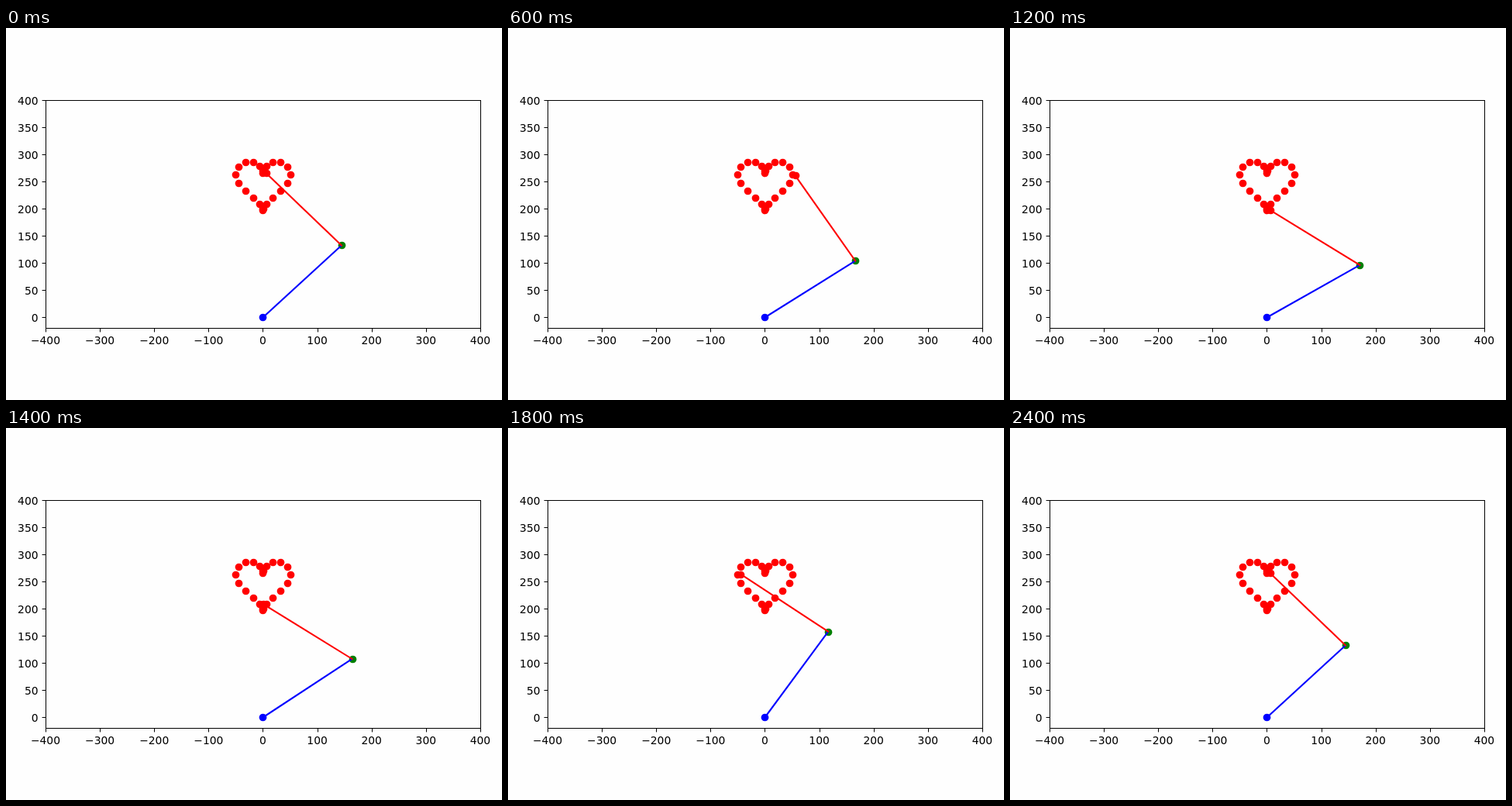
Animation, 640 px wide and 480 px high, one loop 2.5 s. Source, as an HTML page:

```html
<!DOCTYPE html>
<html lang="en">
<head>
<meta charset="utf-8">
<title>Two-link arm tracing a heart</title>
<style>
  html, body { margin: 0; width: 100%; height: 100%; overflow: hidden; background: #fefefe; }
  svg { display: block; }
  text { font: 13.89px "DejaVu Sans", sans-serif; fill: #000; }
  .axis { stroke: #000; stroke-width: 1; fill: none; }
  .link { stroke-width: 2.08; stroke-linecap: square; }
</style>
</head>
<body>
<svg id="stage" width="640" height="480" viewBox="0 0 640 480"></svg>
<script>
const STEPS = 24, STEP_MS = 100, LOOP_MS = 2500;
const SCALE = 0.70125, X0 = 331.45, Y0 = 373.47;
const UPPER = 196.3, FORE = 192.3;
const svg = document.getElementById('stage');

const px = x => X0 + x * SCALE;
const py = y => Y0 - y * SCALE;
const snap = v => Math.round(v) + 0.5;

function add(tag, attrs, text) {
  const el = document.createElementNS('http://www.w3.org/2000/svg', tag);
  for (const k in attrs) el.setAttribute(k, attrs[k]);
  if (text !== undefined) el.textContent = text;
  return svg.appendChild(el);
}

function place(el, p) {
  el.setAttribute('cx', snap(px(p[0])));
  el.setAttribute('cy', snap(py(p[1])));
}

function dot(p, fill) {
  const el = add('circle', { r: 4.86, fill });
  place(el, p);
  return el;
}

function connect(el, a, b) {
  el.setAttribute('x1', px(a[0]));
  el.setAttribute('y1', py(a[1]));
  el.setAttribute('x2', px(b[0]));
  el.setAttribute('y2', py(b[1]));
}

function heart(i) {
  const t = i / STEPS * 2 * Math.PI, k = 3.125;
  return [
    k * 16 * Math.sin(t) ** 3,
    250 + k * (13 * Math.cos(t) - 5 * Math.cos(2 * t) - 2 * Math.cos(3 * t) - Math.cos(4 * t))
  ];
}

// The shoulder uses the angle at the tip, so the hand lands slightly right of its goal.
function pose(i) {
  const [x, y] = heart(i), d = Math.hypot(x, y);
  const lift = Math.acos((FORE ** 2 + d * d - UPPER ** 2) / (2 * FORE * d));
  const inner = Math.acos((UPPER ** 2 + FORE ** 2 - d * d) / (2 * UPPER * FORE));
  const a = Math.atan2(y, x) - lift, b = a + Math.PI - inner;
  const elbow = [UPPER * Math.cos(a), UPPER * Math.sin(a)];
  const hand = [elbow[0] + FORE * Math.cos(b), elbow[1] + FORE * Math.sin(b)];
  return { elbow, hand };
}

// Axes
const label = v => String(v).replace('-', '\u2212');
for (let v = -400; v <= 400; v += 100) {
  const x = snap(px(v));
  add('path', { class: 'axis', d: `M${x} 387.5V392.4` });
  add('text', { x: px(v), y: 408, 'text-anchor': 'middle' }, label(v));
}
for (let v = 0; v <= 400; v += 50) {
  const y = snap(py(v));
  add('path', { class: 'axis', d: `M51.5 ${y}H46.6` });
  add('text', { x: 41.6, y: y + 5, 'text-anchor': 'end' }, v);
}

// Arm and outline
const elbowDot = dot([0, 0], '#008000');
const upper = add('line', { class: 'link', stroke: '#00f' });
const fore = add('line', { class: 'link', stroke: '#f00' });
dot([0, 0], '#00f');
for (let i = 0; i < STEPS; i++) dot(heart(i), '#f00');
const handDot = dot([0, 0], '#f00');
add('rect', { class: 'axis', x: 51.5, y: 93.5, width: 561, height: 294 });

function draw(now) {
  const { elbow, hand } = pose(Math.floor((now % LOOP_MS) / STEP_MS));
  connect(upper, [0, 0], elbow);
  connect(fore, elbow, hand);
  place(elbowDot, elbow);
  place(handDot, hand);
}

const start = performance.now();
function tick() {
  draw(performance.now() - start);
  requestAnimationFrame(tick);
}
tick();
</script>
</body>
</html>
```
